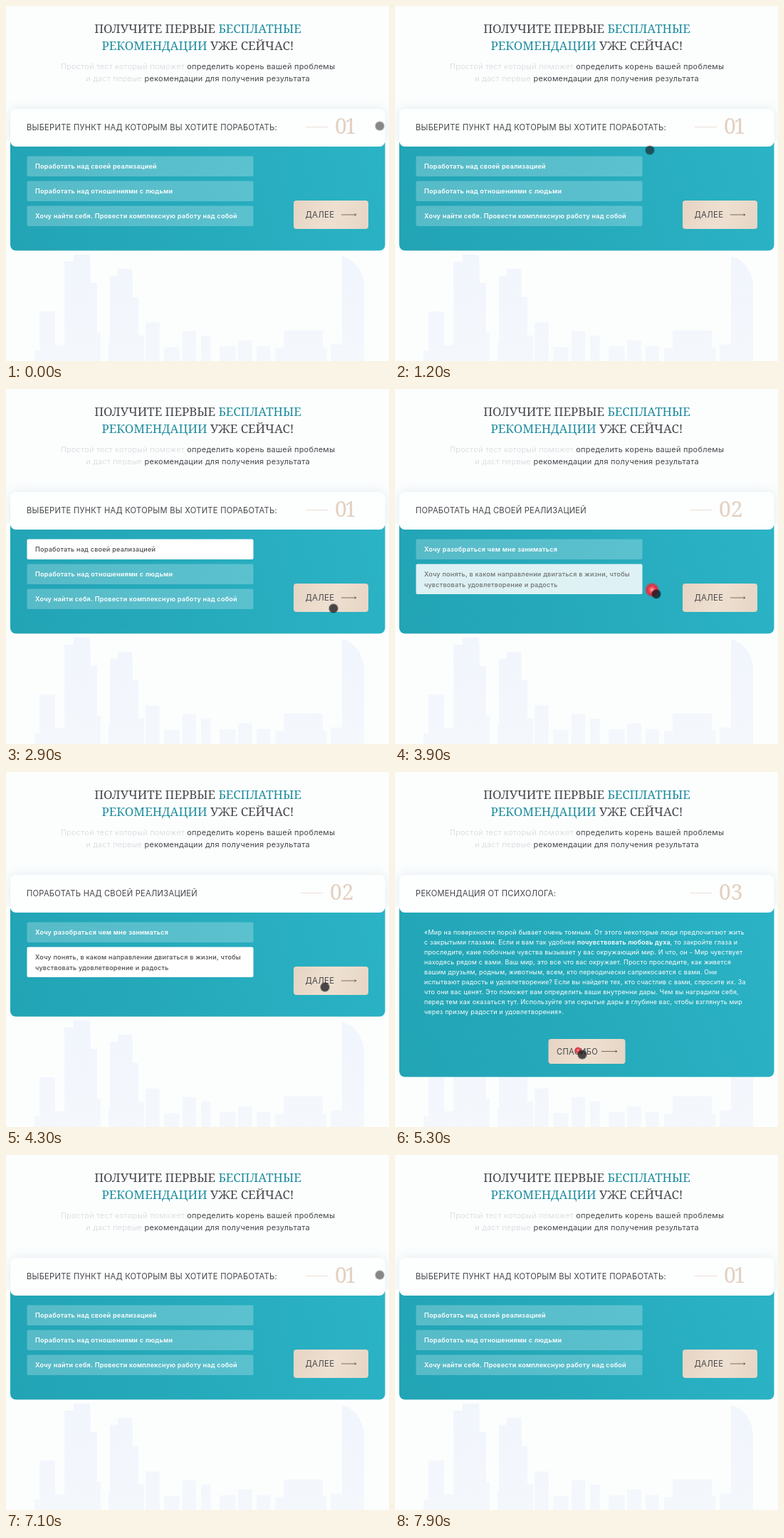
Write an HTML page with a canvas that moves like this. It is 538 by 500 pixels and loops after 8000 ms.

```html
<!DOCTYPE html>
<html lang="ru">
<head>
<meta charset="utf-8">
<title>Тест</title>
<style>
html, body { margin: 0; width: 100%; height: 100%; overflow: hidden; background: #fcfefe; }
canvas { display: block; width: 538px; height: 500px; }
</style>
</head>
<body>
<canvas id="stage" width="538" height="500"></canvas>
<script>
const ctx = document.getElementById('stage').getContext('2d');
const LOOP = 8000, STEP = 100, MID = 269.5;
const INK = '#45454a', TEAL = '#1d8c9c', SAND = '#e2d0c2', PALE = '#d3d7da';
const SANS = 'Inter, "Open Sans", sans-serif', SERIF = '"Noto Serif", serif';

const clamp = v => Math.max(0, Math.min(1, v));
const ramp = (t, a, b) => clamp((t - a) / (b - a));
const mix = (a, b, p) => a + (b - a) * p;
const smooth = p => p * p * (3 - 2 * p);

function seeded(seed) {
  return () => (seed = seed * 16807 % 2147483647) / 2147483647;
}

// runs: [text, colour, weight] drawn one after another on a single line
function line(runs, x, y, size, { align = 'left', family = SANS, spacing = size * 0.024 } = {}) {
  ctx.letterSpacing = spacing + 'px';
  const setFont = w => { ctx.font = `${w || 400} ${size}px ${family}`; };
  const widths = runs.map(([s, , w]) => { setFont(w); return ctx.measureText(s).width; });
  const total = widths.reduce((a, b) => a + b, 0) - spacing;
  let pos = align === 'center' ? x - total / 2 : x;
  runs.forEach(([s, color, w], i) => {
    setFont(w);
    ctx.fillStyle = color;
    ctx.fillText(s, pos, y);
    pos += widths[i];
  });
}

function box(x, y, w, h, r, fill) {
  ctx.beginPath();
  ctx.roundRect(x, y, w, h, r);
  ctx.fillStyle = fill;
  ctx.fill();
}

function blend(x0, y0, x1, y1, ...colors) {
  const g = ctx.createLinearGradient(x0, y0, x1, y1);
  colors.forEach((c, i) => g.addColorStop(i / (colors.length - 1), c));
  return g;
}

function stroke(color, width, path) {
  ctx.strokeStyle = color;
  ctx.lineWidth = width;
  ctx.beginPath();
  path();
  ctx.stroke();
}

// a tower steps down on both sides of its tallest part
function tower(x, w, top) {
  ctx.fillRect(x + w * 0.28, top, w * 0.5, 500 - top);
  ctx.fillRect(x, top + 10, w * 0.8, 500 - top);
  ctx.fillRect(x, top + 40, w, 500 - top);
}

function skyline() {
  const rand = seeded(77);
  ctx.fillStyle = blend(0, 345, 0, 500, '#f1f5fc', '#f4f8fd');
  for (let x = 40; x < 460; x += 26) {
    const h = 15 + rand() * 40;
    ctx.fillRect(x, 500 - h, 12 + rand() * 12, h);
  }
  tower(82, 46, 350);
  tower(146, 40, 370);
  ctx.fillRect(47, 430, 22, 70);
  ctx.fillRect(390, 457, 55, 43);
  ctx.beginPath();
  ctx.moveTo(472, 500);
  ctx.lineTo(472, 352);
  ctx.quadraticCurveTo(499, 360, 503, 392);
  ctx.lineTo(503, 500);
  ctx.fill();
}

function heading() {
  const title = { align: 'center', family: SERIF, spacing: 0 };
  const mid = { align: 'center' };
  line([['ПОЛУЧИТЕ ПЕРВЫЕ ', INK], ['БЕСПЛАТНЫЕ', TEAL]], MID, 38, 16.9, title);
  line([['РЕКОМЕНДАЦИИ', TEAL], [' УЖЕ СЕЙЧАС!', INK]], MID, 62, 16.9, title);
  line([['Простой тест который поможет ', PALE, 300], ['определить корень вашей проблемы', INK]], MID, 89, 10.95, mid);
  line([['и даст первые ', PALE, 300], ['рекомендации для получения результата', INK]], MID, 106, 10.95, mid);
}

function card(x, y, w, bottom) {
  const top = y + 40;
  box(x, top, w, bottom - top, 8, blend(x, bottom, x + w, top, '#22a4b5', '#26abbc', '#2bb3c6'));
  ctx.save();
  ctx.beginPath();
  ctx.rect(0, 0, 538, y + 45);
  ctx.clip();
  ctx.shadowColor = 'rgba(90,130,150,.16)';
  ctx.shadowBlur = 16;
  box(x, y, w, 53, 8, '#fdfefe');
  ctx.restore();
  box(x, y, w, 53, 8, '#fdfefe');
}

function arrow(x, y, length) {
  stroke('#5c5049', 0.8, () => {
    ctx.moveTo(x, y);
    ctx.lineTo(x + length, y);
    ctx.moveTo(x + length - 2.5, y - 1.5);
    ctx.lineTo(x + length, y);
    ctx.lineTo(x + length - 2.5, y + 1.5);
  });
}

function sandButton(x, y, w, h) {
  box(x, y, w, h, 4, blend(x, y, x + w, y + h, '#e6d4c3', '#eee0d1', '#e6d5c4'));
}

function nextButton() {
  sandButton(404, 274, 105, 40);
  line([['ДАЛЕЕ', INK]], 420.5, 298, 11.4);
  arrow(471, 294, 21);
}

function question(title, number, left) {
  line([[title, INK]], 29, 175, 11.15);
  line([[number, SAND, 500]], left, 179.5, 30, { family: SERIF, spacing: 455 - left ? -3 : 0 });
  stroke('#eadfd6', 1, () => { ctx.moveTo(left - 41, 170.5); ctx.lineTo(left - 10, 170.5); });
}

function option(y, rows, on = 0) {
  const h = 28.5 + (rows.length - 1) * 14;
  const shade = Math.round(mix(255, 75, on));
  const ink = `rgb(${shade},${shade},${shade})`;
  box(29.5, y, 318, h, 2, `rgba(255,255,255,${mix(0.24, 1, on)})`);
  rows.forEach((s, i) => line([[s, ink, on > 0.4 ? 500 : 600]], 41, y + 17.5 + i * 14.5, 9.1));
}

function first(t) {
  card(6, 145, 526.5, 344.5);
  question('ВЫБЕРИТЕ ПУНКТ НАД КОТОРЫМ ВЫ ХОТИТЕ ПОРАБОТАТЬ:', '01', 462);
  option(211.5, ['Поработать над своей реализацией'], t < 7000 ? ramp(t, 2000, 2300) : 0);
  option(246.5, ['Поработать над отношениями с людьми']);
  option(281.5, ['Хочу найти себя. Провести комплексную работу над собой']);
  nextButton();
}

function second(t) {
  card(6, 145, 526.5, 344.5);
  question('ПОРАБОТАТЬ НАД СВОЕЙ РЕАЛИЗАЦИЕЙ', '02', 455);
  option(211.5, ['Хочу разобраться чем мне заниматься']);
  option(246.5, ['Хочу понять, в каком направлении двигаться в жизни, чтобы',
    'чувствовать удовлетворение и радость'], ramp(t, 3660, 3960));
  nextButton();
}

const advice = [
  '«Мир на поверхности порой бывает очень томным. От этого некоторые люди предпочитают жить',
  'с закрытыми глазами. Если и вам так удобнее *почувствовать любовь духа*, то закройте глаза и',
  'проследите, каие побочные чувства вызывает у вас окружающий мир. И что, он - Мир чувствует',
  'находясь рядом с вами. Ваш мир, это все что вас окружает. Просто проследите, как живется',
  'вашим друзьям, родным, животным, всем, кто переодически саприкосается с вами. Они',
  'испытвают радость и удовлетворение? Если вы найдете тех, кто счастлив с вами, спросите их. За',
  'что они вас ценят. Это поможет вам определить ваши внутренни дары. Чем вы наградили себя,',
  'перед тем как оказаться тут. Используйте эти скрытые дары в глубине вас, чтобы взглянуть мир',
  'через призму радости и удовлетворения».'
];

function third() {
  card(6, 145, 526.5, 429.5);
  question('РЕКОМЕНДАЦИЯ ОТ ПСИХОЛОГА:', '03', 455);
  advice.forEach((s, i) => {
    const runs = s.split('*').map((part, k) => [part, '#fff', k % 2 ? 600 : 400]);
    line(runs, 41, 229 + i * 14, 8.92);
  });
  sandButton(215.5, 376, 108, 35);
  line([['СПАСИБО', INK]], 227, 398, 11.2);
  arrow(290, 393.5, 22);
}

function finale() {
  const mid = { align: 'center' }, wide = { align: 'center', spacing: 1.5 };
  card(118, 140, 303, 367);
  line([['КАК ПОПАСТЬ НА КОНСУЛЬТАЦИЮ?', INK]], MID, 173.5, 12, mid);
  line([['Запишитесь на ', '#fff'], ['первую бесплатную', '#fff', 600]], MID, 221, 10.8, mid);
  line([['консультацию', '#fff', 600], [', нажав на кнопку.', '#fff']], MID, 238, 10.8, mid);
  stroke('#fff', 1, () => {
    ctx.moveTo(371, 237.5);
    ctx.bezierCurveTo(385, 241, 385, 257, 373, 262.5);
    ctx.moveTo(374.5, 257.5);
    ctx.lineTo(372.5, 262.5);
    ctx.lineTo(377.5, 263);
  });
  sandButton(150.5, 274.5, 237.5, 47);
  line([['ЗАПИСАТЬСЯ НА', '#86705f', 500]], MID, 294.5, 7, wide);
  line([['КОНСУЛЬТАЦИЮ', '#86705f', 500]], MID, 305.5, 7, wide);
  line([['Стоимость сессий индивидуальна.', '#fff', 500]], MID, 341, 7, mid);
  line([['Количество сессий индивидуально.', '#fff', 500]], MID, 352.5, 7, mid);
}

const stops = [
  { at: 400, x: 525, y: 169 },
  { at: 1200, x: 358, y: 203 },
  { at: 1700, x: 232, y: 261 },
  { at: 2050, x: 215, y: 234, click: true },
  { at: 2900, x: 460, y: 309, click: true },
  { at: 3780, x: 356, y: 280, click: true },
  { at: 4300, x: 448, y: 303, click: true },
  { at: 5260, x: 263, y: 398, click: true },
  { at: 6200, x: 263, y: 398 },
  { at: 7100, x: 525, y: 169 },
  { at: 7900, x: 285, y: 274 }
];

// the hand glides between stops, bowing to its right
function pointer(t) {
  const next = stops.findIndex(s => s.at > t);
  if (next === 0) return stops[0];
  const a = stops.at(next < 0 ? -1 : next - 1), b = stops.at(next);
  const p = smooth(ramp(t, a.at, b.at));
  const bow = 0.15 * Math.sin(Math.PI * p);
  return {
    x: mix(a.x, b.x, p) - bow * (b.y - a.y),
    y: mix(a.y, b.y, p) + bow * (b.x - a.x)
  };
}

function ripple(x, y, age) {
  const r = 2.3 + age * 0.065;
  const g = ctx.createRadialGradient(x, y, 0, x, y, r);
  ['#ffb3b8', '#f05560', '#e02c3c', 'rgba(224,44,60,.2)'].forEach((c, i) => g.addColorStop(i / 3, c));
  ctx.globalAlpha = 1 - ramp(age, 120, 240);
  box(x - r, y - r, 2 * r, 2 * r, r, g);
  ctx.globalAlpha = 1;
}

function cursor(t) {
  if (t >= 6100 && t < 7100) return;
  const { x, y } = pointer(t);
  for (const { at, click } of stops) {
    if (click && t > at && t < at + 220) ripple(x - 6, y - 6, t - at);
  }
  const lap = t < 7100 ? t : t - 6700;
  const alpha = mix(0.46, 0.76, ramp(lap, 400, 2900)) * (1 - ramp(t, 5500, 6100) * (t < 7100));
  box(x - 7, y - 7, 14, 14, 7, `rgba(20,18,24,${alpha * 0.4})`);
  box(x - 6, y - 6, 12, 12, 6, `rgba(20,18,24,${alpha * 0.85})`);
}

function draw(now) {
  const t = Math.floor((now % LOOP) / STEP) * STEP;
  ctx.fillStyle = '#fcfefe';
  ctx.fillRect(0, 0, 538, 500);
  skyline();
  heading();
  if (t < 3100 || t >= 7100) first(t);
  else if (t < 4400) second(t);
  else if (t < 5400) third();
  else finale();
  cursor(t);
}

let start;
function tick(now) {
  start ??= now;
  draw(now - start);
  requestAnimationFrame(tick);
}
requestAnimationFrame(tick);
</script>
</body>
</html>
```
